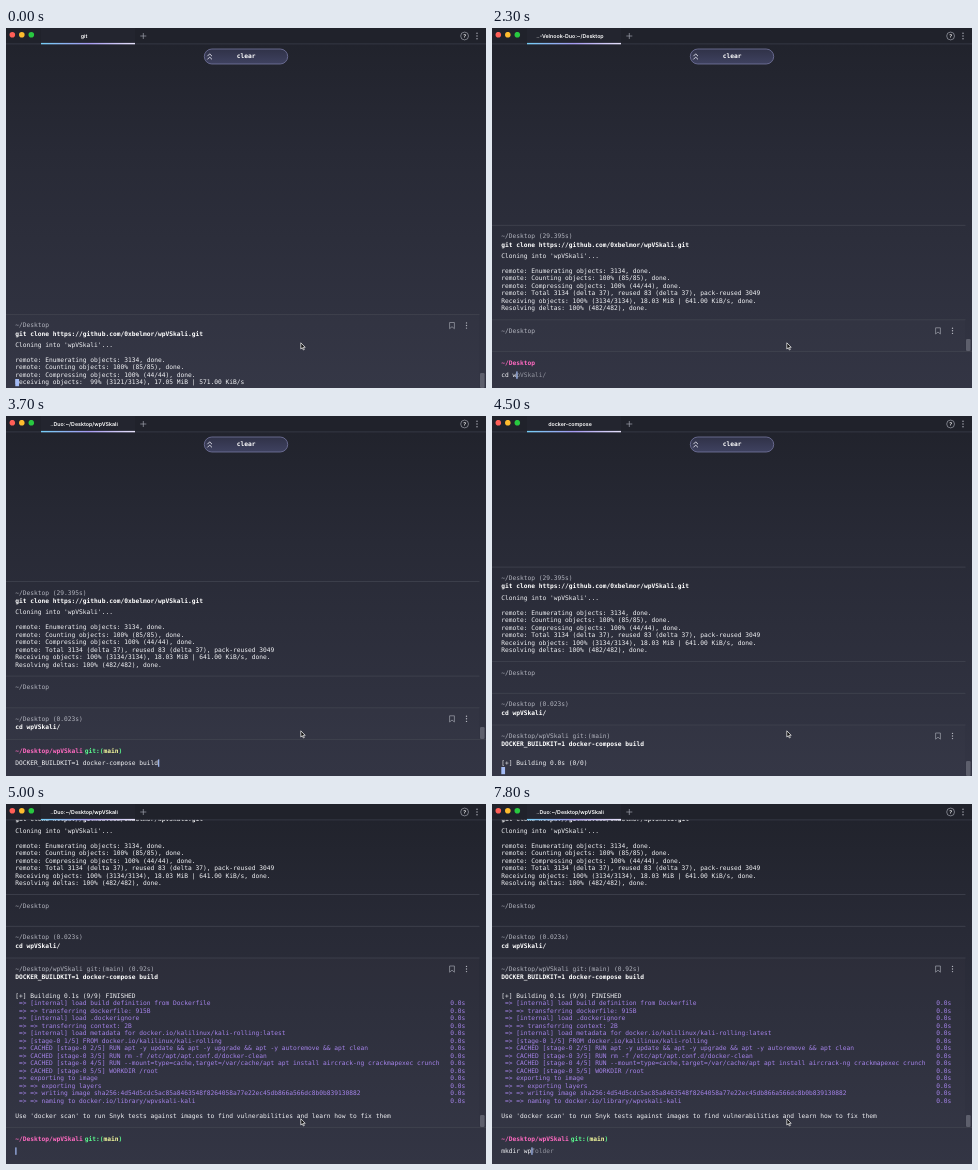
An HTML page for the animation above (8 s loop, 480 by 360 pixels).

```html
<!DOCTYPE html>
<html lang="en">
<head>
<meta charset="utf-8">
<title>Terminal session</title>
<style>
  html, body { margin: 0; width: 100%; height: 100%; overflow: hidden; background: #282a36; }
  svg { display: block; width: 480px; height: 360px; }
  text { font: 6.24px "DejaVu Sans Mono", monospace; fill: #f2f3f6; text-rendering: geometricPrecision; white-space: pre; }
  .bold { font-weight: 700; fill: #fff; }
  .head { fill: #b2b4be; }
  .ghost { fill: #92949f; }
  .step { fill: #a583ea; }
  .path { font-weight: 700; fill: #ff6ac1; }
  .git { font-weight: 700; fill: #5af78e; }
  .branch { font-weight: 700; fill: #f3f99d; }
  .tab { font: 600 5.3px Inter, Roboto, sans-serif; fill: #fff; text-anchor: middle; }
  .icon { fill: none; stroke: #a0a2ad; stroke-width: .7; }
  .dots { fill: #b4b6c0; }
</style>
</head>
<body>
<svg viewBox="0 0 480 360">
  <defs>
    <linearGradient id="bg" x2="0" y2="1">
      <stop stop-color="#20222b"/>
      <stop offset=".35" stop-color="#282a36"/>
      <stop offset="1" stop-color="#333544"/>
    </linearGradient>
    <linearGradient id="accent">
      <stop stop-color="#74cdf5"/>
      <stop offset=".5" stop-color="#a59af0"/>
      <stop offset="1" stop-color="#e6e2fa"/>
    </linearGradient>
    <linearGradient id="pillFill" x2="0" y2="1">
      <stop stop-color="#303248"/>
      <stop offset="1" stop-color="#3f4260"/>
    </linearGradient>
  </defs>
  <rect width="480" height="360" fill="url(#bg)"/>
  <g id="pill">
    <rect x="198.3" y="21" width="83.4" height="15" rx="7.5" fill="url(#pillFill)" stroke="#7577a0" stroke-width=".8"/>
    <path d="M201.4 28.2l2.3-2.3 2.3 2.3M201.4 31.4l2.3-2.3 2.3 2.3" fill="none" stroke="#e4e5ee" stroke-width=".9"/>
    <text class="bold" x="230.7" y="30.2">clear</text>
  </g>
  <g id="view"></g>
  <rect id="thumb" x="474" width="4.6" rx="1.2" fill="#5d5f6c"/>
  <g>
    <rect width="480" height="15.8" fill="#20222b"/>
    <rect y="15.5" width="480" height=".8" fill="#3b3d4a"/>
    <rect x="35" width="94" height="15" fill="#23252f"/>
    <rect x="35" y="14.9" width="94" height="1.4" fill="url(#accent)"/>
    <circle cx="6.3" cy="6.7" r="2.8" fill="#ff5f57"/>
    <circle cx="15.8" cy="6.7" r="2.8" fill="#febc2e"/>
    <circle cx="25.3" cy="6.7" r="2.8" fill="#28c840"/>
    <text id="tab" class="tab" x="78" y="10"></text>
    <path class="icon" d="M134.3 8h6M137.3 5v6"/>
    <circle class="icon" cx="458.6" cy="8" r="3.9"/>
    <text class="tab" x="458.6" y="10">?</text>
    <g class="dots"><circle cx="471" cy="5.2" r=".7"/><circle cx="471" cy="8" r=".7"/><circle cx="471" cy="10.8" r=".7"/></g>
  </g>
  <path d="M294.8 314.8v6.2l1.5-1.3 1 2.2 1-.4-1-2.2h1.9z" fill="#111" stroke="#fff" stroke-width=".7"/>
</svg>
<script>
const LOOP = 8000, LEFT = 9.3, CHAR = 3.757, LINE = 7.5;
const PROMPT_TOP = 323.5, RUN_BOTTOM = 331.5, MOUSE_Y = 318;
const CARET = '#a3bbf5', RULE = '#40434f';
const HOME = '..-Velnook-Duo:~/Desktop', REPO = '..Duo:~/Desktop/wpVSkali';
const BUILD = 'DOCKER_BUILDKIT=1 docker-compose build';

const byId = id => document.getElementById(id);
const view = byId('view');

function add(tag, attrs, text) {
  const el = document.createElementNS('http://www.w3.org/2000/svg', tag);
  for (const k in attrs) el.setAttribute(k, attrs[k]);
  if (text) el.textContent = text.replace(/ /g, '\u00a0');
  view.append(el);
}
const rect = (x, y, width, height, fill) => add('rect', { x, y, width, height, fill });
// y is the middle of the text line, col counts characters
const write = (text, y, cls = '', col = 0) =>
  add('text', { x: LEFT + col * CHAR, y: y + 1.9, class: cls }, text);

const cloneStart = `Cloning into 'wpVSkali'...

remote: Enumerating objects: 3134, done.
remote: Counting objects: 100% (85/85), done.
remote: Compressing objects: 100% (44/44), done.`.split('\n');
const cloneEnd = `remote: Total 3134 (delta 37), reused 83 (delta 37), pack-reused 3049
Receiving objects: 100% (3134/3134), 18.03 MiB | 641.00 KiB/s, done.
Resolving deltas: 100% (482/482), done.`.split('\n');
const buildSteps = ` => [internal] load build definition from Dockerfile
 => => transferring dockerfile: 915B
 => [internal] load .dockerignore
 => => transferring context: 2B
 => [internal] load metadata for docker.io/kalilinux/kali-rolling:latest
 => [stage-0 1/5] FROM docker.io/kalilinux/kali-rolling
 => CACHED [stage-0 2/5] RUN apt -y update && apt -y upgrade && apt -y autoremove && apt clean
 => CACHED [stage-0 3/5] RUN rm -f /etc/apt/apt.conf.d/docker-clean
 => CACHED [stage-0 4/5] RUN --mount=type=cache,target=/var/cache/apt apt install aircrack-ng crackmapexec crunch
 => CACHED [stage-0 5/5] WORKDIR /root
 => exporting to image
 => => exporting layers
 => => writing image sha256:4d54d5cdc5ac85a8463548f8264058a77e22ec45db866a566dc8b0b839130882
 => => naming to docker.io/library/wpvskali-kali`.split('\n');
const scanTip = "Use 'docker scan' to run Snyk tests against images to find vulnerabilities and learn how to fix them";

const clone = (time, out) => ({
  head: '~/Desktop' + time,
  cmd: 'git clone https://github.com/0xbelmor/wpVSkali.git',
  out
});
const receiving = (count, size, speed) =>
  clone('', [...cloneStart, `Receiving objects:  99% (${count}/3134), ${size} MiB | ${speed}.00 KiB/s`]);
const build = (time, out) => ({ head: '~/Desktop/wpVSkali git:(main)' + time, cmd: BUILD, out });

const cloned = clone(' (29.395s)', [...cloneStart, ...cloneEnd]);
const blank = { head: '~/Desktop', cmd: '', out: [] };
const entered = { head: '~/Desktop (0.023s)', cmd: 'cd wpVSkali/', out: [] };
const past = [cloned, blank, entered];
const built = build(' (0.92s)', ['', '[+] Building 0.1s (9/9) FINISHED', ...buildSteps, '', scanTip]);

const run = (tab, ...blocks) => ({ tab, blocks, running: true });
const ask = (tab, ...blocks) => ({ tab, blocks, dir: tab === HOME ? '~/Desktop' : '~/Desktop/wpVSkali', git: tab === REPO });
const building = out => run('docker-compose', ...past, build('', out));
const first = ask(HOME, cloned), second = ask(HOME, cloned, blank);
const third = ask(REPO, ...past), last = ask(REPO, ...past, built);

// time, scene, typed text, suggested rest
const steps = [
  [0, run('git', receiving(3121, '17.05', 571))],
  [200, run('git', receiving(3124, '17.30', 574))],
  [300, run('git', receiving(3128, '17.57', 576))],
  [400, run('git', receiving(3131, '17.82', 578))],
  [1000, first],
  [1100, second],
  [1600, { ...second, hideCaret: true }],
  [1900, second, 'c'],
  [2000, second, 'c', 'lear'],
  [2100, second, 'cd'],
  [2200, second, 'cd ', 'wpVSkali/'],
  [2300, second, 'cd w', 'pVSkali/'],
  [2400, second, 'cd wp', 'VSkali/'],
  [2600, second, 'cd wpVSkali/'],
  [3100, { ...third, tab: HOME, git: false }],
  [3200, { ...third, git: false }],
  [3300, third],
  [3700, third, BUILD],
  [4100, building([''])],
  [4400, building(['', ''])],
  [4500, building(['', '[+] Building 0.0s (0/0)', ''])],
  [4700, building(['', '[+] Building 0.1s (2/3)', ...buildSteps.slice(0, 5), ''])],
  [4800, building(['', '[+] Building 0.1s (9/9) FINISHED', ...buildSteps, ''])],
  [5000, last],
  [5900, last, 'm', 'kdir wpfolder'],
  [6200, last, 'mk', 'dir wpfolder'],
  [6900, last, 'mkd', 'ir wpfolder'],
  [7200, last, 'mkdi', 'r wpfolder'],
  [7300, last, 'mkdir', ' wpfolder'],
  [7400, last, 'mkdir ', 'wpfolder'],
  [7600, last, 'mkdir w', 'pfolder'],
  [7800, last, 'mkdir wp', 'folder']
];

const height = b => b.out.length ? 34.5 + LINE * b.out.length : 31.7;

function drawTools(y) {
  add('path', { class: 'icon', d: `M443.6 ${y - 3}h4.8v6.2l-2.4-2-2.4 2z` });
  for (const dy of [-2.6, 0, 2.6]) add('circle', { class: 'dots', cx: 460.5, cy: y + dy, r: .7 });
}

function drawBlock(b, top, bottom) {
  const hover = top < MOUSE_Y && MOUSE_Y < bottom;
  if (hover) rect(0, top, 473.5, bottom - top, 'rgba(255,255,255,.012)');
  rect(0, top - .4, 473.5, .8, RULE);
  write(b.head, top + 11, 'head');
  write(b.cmd, top + 19.3, 'bold');
  b.out.forEach((line, i) => {
    const y = top + 30.5 + i * LINE, step = line.startsWith(' =>');
    write(line, y, step ? 'step' : '');
    if (step) write('0.0s', y, 'step', 115.8);
  });
  if (hover) drawTools(top + 11);
}

function drawPrompt(s, typed, ghost) {
  rect(0, PROMPT_TOP - .4, 480, .8, RULE);
  write(s.dir, 335, 'path');
  if (s.git) {
    const col = s.dir.length + .5;
    write('git:(', 335, 'git', col);
    write('main', 335, 'branch', col + 5);
    write(')', 335, 'git', col + 9);
  }
  write(typed, 347);
  write(ghost, 347, 'ghost', typed.length);
  if (!s.hideCaret) rect(LEFT + typed.length * CHAR, 343.4, 1.2, 7.4, CARET);
}

function draw([, s, typed = '', ghost = '']) {
  view.replaceChildren();
  byId('tab').textContent = s.tab;
  const newest = s.blocks.at(-1);
  let bottom = s.running ? RUN_BOTTOM - LINE * newest.out.length + height(newest) : PROMPT_TOP;
  for (const b of [...s.blocks].reverse()) {
    const top = bottom - height(b);
    drawBlock(b, top, bottom);
    bottom = top;
  }
  if (s.running) rect(LEFT, 351, CHAR, 7.2, CARET);
  else drawPrompt(s, typed, ghost);
  byId('pill').style.display = bottom > 38 ? '' : 'none';
  byId('thumb').setAttribute('y', s.running ? 345 : 311);
  byId('thumb').setAttribute('height', s.running ? 15 : 12);
}

let shown;
function tick() {
  const t = performance.now() % LOOP;
  const step = steps.findLast(s => s[0] <= t);
  if (step !== shown) draw(shown = step);
  requestAnimationFrame(tick);
}
tick();
</script>
</body>
</html>
```
